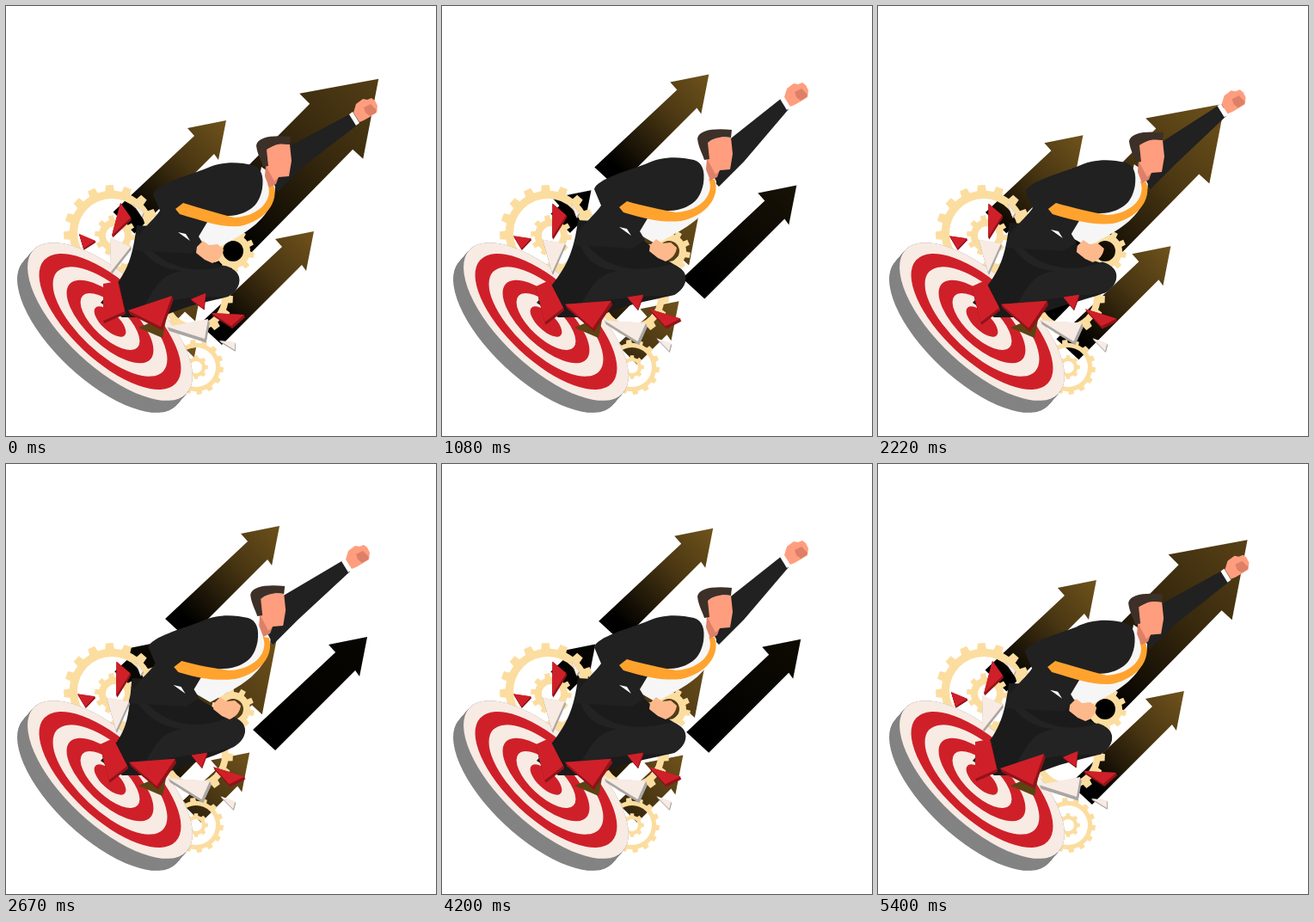
Recreate the animation shown at these times as an HTML page with a canvas. Size 500 px wide and 500 px high, loop 5430 ms.

```html
<!DOCTYPE html>
<html lang="en">
<head>
<meta charset="utf-8">
<title>Breaking through the target</title>
<style>
  html, body { margin: 0; width: 100%; height: 100%; overflow: hidden; background: #fff; }
  canvas { display: block; width: 100vw; height: 100vh; }
</style>
</head>
<body>
<canvas id="stage" width="500" height="500"></canvas>
<script>
const ctx = document.getElementById('stage').getContext('2d');
const LOOP = 5430, STEP = 30, CYCLE = 25.77;

const RED = '#cf2029', DEEP_RED = '#921319', CREAM = '#f7ebe4', GREY = '#aaa6a3';
const SKIN = '#ff9e7e', SKIN_DARK = '#dd8067', GOLD = '#fcdda0', SUIT = '#212121';

const clamp = (v, lo = 0, hi = 1) => Math.min(hi, Math.max(lo, v));
const mix = (a, b, k) => a + (b - a) * k;
const poly = pts => 'M' + pts.map(p => p.join()).join('L') + 'Z';

function fill(color, d) {
  ctx.fillStyle = color;
  ctx.fill(new Path2D(d), 'evenodd');
}

function at(x, y, draw, turn = 0) {
  ctx.save();
  ctx.translate(x, y);
  ctx.rotate(turn);
  draw();
  ctx.restore();
}

// ---- arrows, drawn from the tip at 0,0 ----
const SMALL = 'M0,0L-45,9L-37,18L-133,108L-107,132L-14,39L-9,46Z';
const LARGE = 'M0,0L-92,17L-80,29L-255,205L-205,260L-30,82L-18,93Z';

// Each lane shows only what lies above the diagonal x - y = edge
function arrow(shape, x, y, size, light, edge) {
  const tone = k => `rgb(${[112, 83, 28].map(c => Math.round(c * k * clamp(light)))})`;
  const g = ctx.createLinearGradient(0, 0, -size, size);
  g.addColorStop(0, tone(1));
  g.addColorStop(0.4, tone(0.65));
  g.addColorStop(0.9, tone(0));
  ctx.save();
  ctx.clip(new Path2D(poly([[edge, 0], [500, 0], [500, 500 - edge], [edge + 500, 500]])));
  at(x, y, () => fill(g, shape));
  ctx.restore();
}

function arrows(p) {
  for (const q of [p, p + CYCLE]) {
    const x = 238 + 5.9 * q + 0.065 * q * q;
    if (x < 486) arrow(LARGE, x, 82 + (436 - x) * 0.967, 200, (500 - x) / 90, -170);
  }
  for (const q of [p - CYCLE, p, p + CYCLE]) {
    const move = q * 5.31, xa = 256 + move, xb = 358 + move, rise = move * 0.984;
    if (xa > 160 && xa < 358)
      arrow(SMALL, xa, 133 - rise, 120, Math.min((xa - 175) / 60, (362 - xa) / 45), -115);
    if (xb > 210 && xb < 426)
      arrow(SMALL, xb, 262 - rise, 120, (424 - xb) / 55, -190);
  }
}

// ---- gears ----
function gear(x, y, r, hole, teeth, turn = 0) {
  const body = r * (r > 28 ? 0.88 : 0.8), step = Math.PI * 2 / teeth, pts = [];
  for (let i = 0; i < teeth; i++) {
    for (const [k, rad] of [[-0.27, body], [-0.2, r], [0.2, r], [0.27, body], [0.5, body]]) {
      const a = (i + k) * step + turn;
      pts.push([Math.cos(a) * rad, Math.sin(a) * rad]);
    }
  }
  const bore = `M${hole},0A${hole},${hole},0,1,0,${-hole},0A${hole},${hole},0,1,0,${hole},0Z`;
  at(x, y, () => fill(GOLD, poly(pts) + bore));
}

function gears() {
  gear(123, 264, 56, 40, 16, -0.05);
  gear(127, 267, 24, 11, 10, 0.1);
  gear(130, 322, 24, 11, 10);
  gear(220, 339, 44, 31, 14, 0.05);
  gear(264, 285, 25, 12, 10, 0.2);
  gear(221, 420, 32, 23, 14, 0.1);
  gear(221, 420, 14, 7, 8);
}

// ---- target ----
function target() {
  const disc = (color, k, dx = 0, dy = 0) => {
    ctx.fillStyle = color;
    ctx.beginPath();
    ctx.ellipse(121 + dx, 367 + dy, 122 * k, 52.5 * k, 0.754, 0, Math.PI * 2);
    ctx.fill();
  };
  for (let i = 28; i >= 0; i--) disc('#838383', 1, -i * 0.43, i * 0.5);
  disc(CREAM, 1);
  for (let i = 0; i < 5; i++) disc(i % 2 ? CREAM : RED, 0.86 - i * 0.167);
}

// ---- man: rises and sinks once a cycle, with a short kick near the top ----
function pose(p) {
  const s = Math.sin(Math.PI * p / CYCLE), peak = s ** 12;
  const lift = clamp(1.25 * s), kick = p > 10.1 && p < 11.4 ? 1 : 0;
  const sway = kick ? 6 : lift * (2 - 10 * peak);
  const flap = kick || p > 11.6 ? 0 : 18 * Math.sqrt(Math.sin(Math.PI * p / 11.6));
  return {
    hx: sway, hy: -10 * lift + 2 * kick,
    sx: kick ? 6 : sway * 0.8, sy: -6 * lift,
    tx: 197 + (kick ? 9 : sway * 0.4 + lift), ty: 235 + flap - 2 * kick,
    dx: 237 + 20 * lift, dy: 287 - 2 * lift,
    kx: 272 + 12 * lift + Math.min(0, sway * 0.8), ky: 316 - 9 * lift + 7 * kick,
    fx: 419 - 9 * lift + 3 * kick, fy: 119 - 20 * lift + (kick ? 2 : 8 * peak)
  };
}

function man(p) {
  const { hx, hy, sx, sy, tx, ty, dx, dy, kx, ky, fx, fy } = pose(p);

  // raised arm, cuff and fist
  fill(SUIT, poly([[326 + hx, 165 + hy], [fx - 18, fy + 6], [fx - 10, fy + 19],
    [345 + sx, 187 + sy], [316 + sx, 216 + sy], [300 + sx, 200 + sy]]));
  at(fx, fy, () => {
    fill('#fff', 'M-20,7L-16,4L-8,17L-12,20Z');
    fill(SKIN, 'M-15,5L-12,-5L-4,-11L1,-10L6,-12L10,-9L13,-3L12,5L4,10L-3,14L-8,16Z');
    fill(SKIN_DARK, 'M-3,-1L5,-5L12,2L11,5L4,9L-1,5Z');
  });

  // shirt
  at(sx, sy, () => fill('#f6f6f6',
    'M297,187L304,192L313,210C312,235 295,254 270,268L243,283L217,268L240,238L288,230Z'));

  // legs
  fill('#1b1b1b', `M${152 + sx},${255 + sy}C${148 + sx},285 144,305 125,328L110,345L135,362L180,362
    C210,348 235,344 ${kx - 14},${ky + 22}C${kx + 2},${ky + 12} ${kx + 3},${ky - 2} ${kx - 7},${ky - 9}
    L${dx + 4},${dy + 10}L${228 + sx},${278 + sy}L${205 + sx},${258 + sy}Z`);
  fill('#232323', `M${152 + sx},${264 + sy}C175,300 215,315 ${kx - 17},${ky - 14}
    C${kx + 4},${ky - 8} ${kx + 4},${ky + 12} ${kx - 14},${ky + 22}C235,338 195,338 160,350
    C175,325 180,312 205,308C180,306 165,295 ${152 + sx},${276 + sy}Z`);

  // jacket
  at(sx, sy, () => {
    fill(SUIT, `M287,185C297,188 300,198 298,212C295,228 288,238 268,243C255,245 244,244 236,248
      L224,268L230,278L215,288L148,284C151,262 170,252 179,238L171,219C174,207 212,197 230,190
      C250,180 270,181 287,185Z`);
    fill('#fff', 'M200,263L209,265L214,273Z');
  });

  // tie
  fill('#ffa32e', `M${304 + sx},${207 + sy}C${311 + sx},${222 + sy} ${298 + sx},${244 + sy} ${266 + sx},${246 + sy}
    C${tx + 50},${mix(ty, 246 + sy, 0.6)} ${tx + 26},${ty - 1} ${tx + 9},${ty - 6}L${tx},${ty + 1}L${tx + 5},${ty + 7}
    C${tx + 35},${ty + 16} ${252 + sx},${258 + sy} ${272 + sx},${256 + sy}
    C${301 + sx},${250 + sy} ${318 + sx},${228 + sy} ${311 + sx},${208 + sy}Z`);

  // lower hand
  at(dx, dy, () => fill('#fdb98c',
    'M-8,-14L-1,-9L9,-10L16,-4C15,4 10,9 3,12L-6,8L-16,0L-15,-7Z'));

  // head
  at(hx, hy, () => {
    fill(SKIN_DARK, 'M302,184L318,196L314,207L306,211L301,198Z');
    fill(SKIN, 'M302,167L316,160L330,161L332,180L329,198L317,199L312,204L303,187Z');
    fill('#3d3028', `M291,162C293,152 310,150 331,152L330,161C320,159 310,161 303,167
      L305,186L299,187C297,180 292,172 291,162Z`);
  });
}

// ---- shards: triangles that tip outwards and back ----
const RED_SHARDS = [
  [[133, 229], [145, 246], [123, 267]],
  [[85, 265], [104, 273], [90, 282]],
  [[239, 357], [277, 359], [262, 372]],
  [[215, 341], [232, 334], [230, 352]],
  [[142, 354], [193, 337], [180, 373]],
  [[113, 323], [130, 320], [138, 355], [113, 366]]
];
const WHITE_SHARDS = [
  [[121, 269], [145, 280], [122, 309]],
  [[148, 230], [160, 240], [158, 245]],
  [[187, 373], [235, 364], [231, 387]],
  [[248, 389], [266, 391], [266, 400]]
];

function shard(pts, face, side, tipped) {
  const mean = n => pts.reduce((sum, p) => sum + p[n], 0) / pts.length;
  const x = mean(0), y = mean(1);
  const d = poly(pts.map(p => [p[0] - x, p[1] - y]));
  const turn = tipped ? (x < 140 ? -0.25 : 0.25) : 0;
  const depth = Math.hypot(pts[0][0] - x, pts[0][1] - y) / 7;
  for (let i = depth; i >= 0; i -= 0.5) at(x + i * 0.4, y + i, () => fill(side, d), turn);
  at(x, y, () => fill(face, d), turn);
}

function shards(p) {
  const tipped = p > 10.1 && p < 10.1 + CYCLE / 2;
  fill('#5b4314', 'M154,374L187,360L182,386Z');
  for (const pts of WHITE_SHARDS) shard(pts, CREAM, GREY, tipped);
  for (const pts of RED_SHARDS) shard(pts, RED, DEEP_RED, tipped);
}

function draw(ms) {
  const p = Math.floor((ms % LOOP) / STEP) % CYCLE;
  ctx.fillStyle = '#fff';
  ctx.fillRect(0, 0, 500, 500);
  arrows(p);
  gears();
  target();
  man(p);
  shards(p);
}

const start = performance.now();
function tick() {
  draw(performance.now() - start);
  requestAnimationFrame(tick);
}
tick();
</script>
</body>
</html>
```
